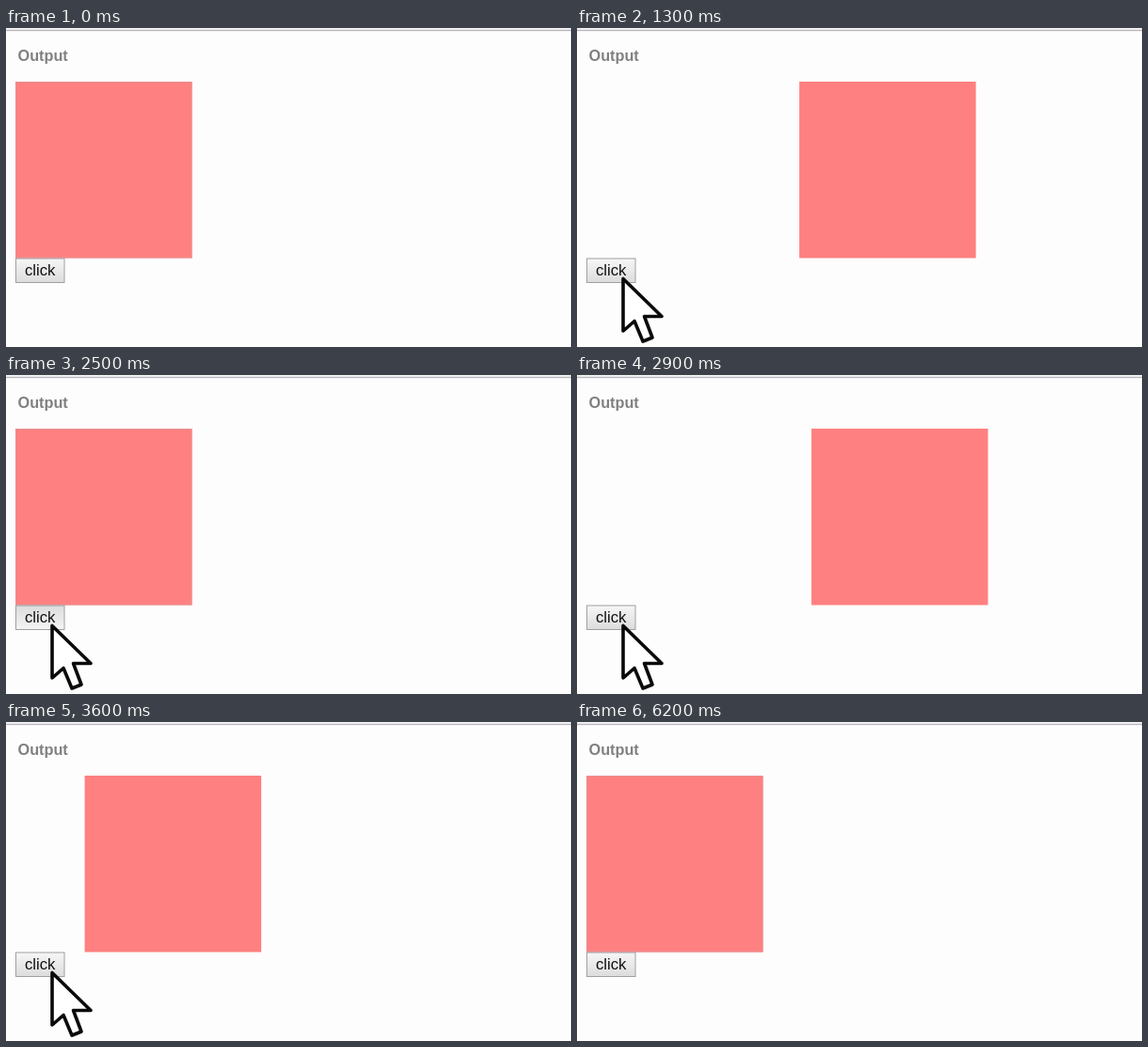
These frames come from a looping animation (600x339 px, 6.9 s). An HTML page:

```html
<!DOCTYPE html>
<html lang="en">
<head>
<meta charset="utf-8">
<title>Click to slide</title>
<style>
  html, body { margin: 0; width: 100%; height: 100%; overflow: hidden; background: #fefdfe; }
  svg { display: block; width: 100%; height: 100%; }
  text { font-family: "Liberation Sans", Arial, sans-serif; }
</style>
</head>
<body>
<svg viewBox="0 0 600 339">
  <defs>
    <linearGradient id="face" x2="0" y2="1">
      <stop offset="0" stop-color="#f6f6f6"/>
      <stop offset="1" stop-color="#dcdcdc"/>
    </linearGradient>
    <linearGradient id="pressed" x2="0" y2="1">
      <stop offset="0" stop-color="#dcdcdc"/>
      <stop offset="1" stop-color="#f4f4f4"/>
    </linearGradient>
  </defs>

  <rect width="600" height="2" fill="#f0eff0"/>
  <rect y="2" width="600" height="1" fill="#b8b6ba"/>
  <rect y="3" width="600" height="1" fill="#eeedef"/>
  <text x="12.5" y="34.5" font-size="16.25" font-weight="bold" fill="#808080">Output</text>

  <g id="box">
    <rect y="57" width="187.5" height="187.5" fill="#ff8080"/>
    <rect id="edge" x=".5" y="57.5" width="186.5" height="186.5" fill="none" stroke="#e69092"/>
  </g>

  <rect id="button" x="10.5" y="245" width="51.5" height="25.5" fill="url(#face)" stroke="#a0a0a0"/>
  <text x="20" y="263.4" font-size="16.67" fill="#111">click</text>

  <path id="cursor" d="M49 266.5V322L61 311.5L70 333L80 329L71.5 306.5H90Z"
        fill="#fff" stroke="#0a0a0a" stroke-width="3.6" stroke-linejoin="round"/>
</svg>
<script>
  const LOOP = 6900, TICK = 100, SLIDE = 400;
  const HOME = 10, TRAVEL = 312.5;
  const CURSOR = [900, 4100];
  // press time, release time (the slide starts on release), direction
  const clicks = [
    [900, 1041, 1],
    [1700, 1844, -1],
    [2500, 2629, 1],
    [3200, 3329, -1]
  ];
  const el = id => document.getElementById(id);
  const clamp = v => Math.min(1, Math.max(0, v));
  const swing = p => 0.5 - Math.cos(p * Math.PI) / 2;

  function draw(t) {
    let shift = 0, down = false;
    for (const [press, release, dir] of clicks) {
      shift += dir * swing(clamp((t - release) / SLIDE));
      down = down || (t >= press && t < release);
    }
    el("box").setAttribute("transform", `translate(${HOME + TRAVEL * shift})`);
    el("edge").style.display = Math.abs(shift) < 0.001 ? "" : "none";
    el("button").setAttribute("fill", down ? "url(#pressed)" : "url(#face)");
    el("cursor").style.display = t >= CURSOR[0] && t < CURSOR[1] ? "" : "none";
  }

  const start = performance.now();
  function frame() {
    const t = (performance.now() - start) % LOOP;
    draw(Math.floor(t / TICK) * TICK);
    requestAnimationFrame(frame);
  }
  frame();
</script>
</body>
</html>
```
